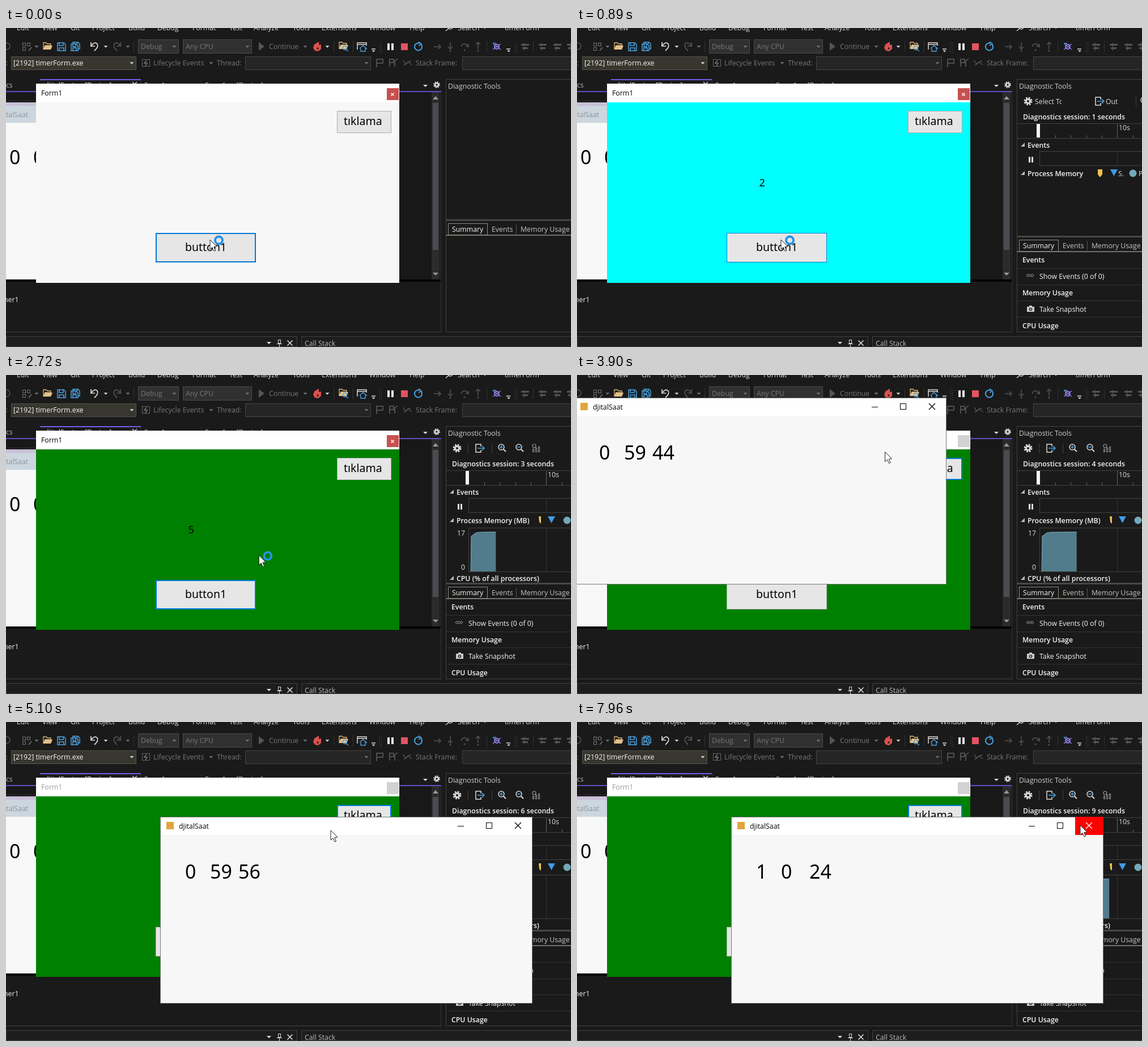
Animation, 997 px wide and 562 px high, one loop 7990 ms. Source, as an HTML page with a canvas:

```html
<!DOCTYPE html>
<html lang="tr">
<head>
<meta charset="utf-8">
<title>Timer form</title>
<style>
html, body { margin: 0; width: 100%; height: 100%; overflow: hidden; background: #1a1a1a; }
canvas { display: block; }
</style>
</head>
<body>
<canvas id="stage" width="997" height="562"></canvas>
<script>
const g = document.getElementById('stage').getContext('2d');
const LOOP = 7990, OPEN = 3420;
const DIM = '#777', LIGHT = '#dcdcdc', LINE = '#414141', BLUE = '#4ba3e3';

function rect(x, y, w, h, fill, stroke) {
  if (fill) { g.fillStyle = fill; g.fillRect(x, y, w, h); }
  if (stroke) { g.strokeStyle = stroke; g.lineWidth = 1; g.strokeRect(x + .5, y + .5, w - 1, h - 1); }
}
function text(s, x, y, color = LIGHT, size = 12.3, weight = 400, family = 'Open Sans') {
  g.font = `${weight} ${size}px "${family}", sans-serif`;
  g.fillStyle = color;
  g.fillText(s, x, y);
}
function digits(s, x, y) { text(s, x, y, '#000', 34, 500, 'Noto Sans'); }
function path(points, stroke, width = 1.5, fill) {
  g.beginPath();
  for (let i = 0; i < points.length; i += 2) g.lineTo(points[i], points[i + 1]);
  if (fill) { g.closePath(); g.fillStyle = fill; g.fill(); }
  if (stroke) { g.strokeStyle = stroke; g.lineWidth = width; g.stroke(); }
}
function arc(x, y, r, stroke, width = 1.5, from = 0, to = 7) {
  g.beginPath(); g.arc(x, y, r, from, to);
  g.strokeStyle = stroke; g.lineWidth = width; g.stroke();
}
function dot(x, y, r, color) { g.beginPath(); g.arc(x, y, r, 0, 7); g.fillStyle = color; g.fill(); }
function down(x, y, color = LIGHT, r = 4) { path([x - r, y - r / 2, x + r, y - r / 2, x, y + r / 2], 0, 0, color); }
function clipped(x, y, w, h, draw) {
  g.save(); g.beginPath(); g.rect(x, y, w, h); g.clip(); draw(); g.restore();
}
function cross(x, y, r, color, width = 1.2) {
  path([x - r, y - r, x + r, y + r], color, width);
  path([x - r, y + r, x + r, y - r], color, width);
}
function gear(x, y, r, color) {
  g.setLineDash([r * .45, r * .335]); arc(x, y, r, color, r * .5); g.setLineDash([]);
  arc(x, y, r * .6, color, r * .5);
}
function folder(x, y) {
  path([x, y + 12, x, y, x + 5, y, x + 7, y + 2, x + 13, y + 2, x + 13, y + 5, x + 3, y + 5, x, y + 12], '#dcb67a', 1.3);
  path([x, y + 12, x + 3, y + 5, x + 16, y + 5, x + 13, y + 12], 0, 0, '#e3c088');
}
function disk(x, y, s) {
  rect(x, y, s, s, '#1a1a1a');
  path([x, y, x + s - 3, y, x + s, y + 3, x + s, y + s, x, y + s, x, y - .7], BLUE, 1.5);
  path([x + 3, y, x + 3, y + 5, x + s - 4, y + 5, x + s - 4, y], BLUE);
  path([x + 3, y + s, x + 3, y + s - 5, x + s - 3, y + s - 5, x + s - 3, y + s], BLUE);
}
function arrow(x, y, dx, dy, color) {
  path([x - dx * 6, y - dy * 6, x + dx * 6, y + dy * 6], color);
  path([x + dx * 2 - dy * 4, y + dy * 2 - dx * 4, x + dx * 6, y + dy * 6, x + dx * 2 + dy * 4, y + dy * 2 + dx * 4], color);
}
function grip(x) { for (let y = 25; y < 42; y += 4) { rect(x, y, 1, 1, '#666'); rect(x + 3, y + 2, 1, 1, '#666'); } }

// position along [time, x, y] keys
function along(keys, t) {
  let i = 1;
  while (i < keys.length - 1 && keys[i][0] < t) i++;
  const [a, b] = [keys[i - 1], keys[i]];
  const k = Math.min(1, Math.max(0, (t - a[0]) / (b[0] - a[0])));
  return [a[1] + (b[1] - a[1]) * k, a[2] + (b[2] - a[2]) * k];
}
const clockPath = [[4610, -5, 40], [4800, 90, 86], [5070, 272, 167]];
const mousePath = [[2040, 360, 373], [2720, 446, 318], [3250, 625, 162], [3780, 625, 162], [3900, 544, 136],
  [4150, 430, 30], [4570, 296, 64]];
const exitPath = [[6230, 573, 191], [6900, 888, 182]];

function toolbars() {
  const menu = [['Edit', 19], ['View', 64], ['Git', 114], ['Project', 152], ['Build', 216], ['Debug', 267], ['Format', 329],
    ['Test', 394], ['Analyze', 437], ['Tools', 506], ['Extensions', 557], ['Window', 641], ['Help', 712], ['Search', 797], ['timerForm', 880]];
  for (const [s, x] of menu) text(s, x, 4);
  arc(784, -2, 4, LIGHT); path([781, 1, 776, 5], LIGHT); down(845, 0, LIGHT, 3);

  arc(1, 32, 6, '#555', 1.5);
  for (const [x, y] of [[29, 26], [37, 26], [29, 34]]) rect(x, y, 6, 6, 0, '#777');
  path([40, 40, 45, 34], '#777');
  for (const [x, c] of [[54, DIM], [176, LIGHT], [215, DIM], [528, DIM], [567, LIGHT]]) down(x, 33, c, 3.5);
  folder(66, 26); disk(91, 26, 14); disk(118, 25, 12); disk(115, 28, 12);
  for (const [x, d, c] of [[156, 1, LIGHT], [196, -1, '#555']]) {
    path([x - 6 * d, 25, x - 6 * d, 32, x + d, 32], c, 1.7);
    g.beginPath(); g.moveTo(x - 6 * d, 32); g.quadraticCurveTo(x, 23, x + 5 * d, 28);
    g.quadraticCurveTo(x + 8 * d, 33, x, 40); g.strokeStyle = c; g.stroke();
  }
  for (const [x, w, s] of [[233, 72, 'Debug'], [312, 122, 'Any CPU']]) {
    rect(x, 20, w, 25, '#303030', '#4a4a4a'); text(s, x + 5, 37, DIM); down(x + w - 8, 33, DIM, 3.5);
  }
  path([446, 25, 456, 32.5, 446, 40], 0, 0, '#555');
  text('Continue', 464, 37, DIM);
  path([552, 24, 552, 30, 556, 29, 556, 37, 551, 41, 545, 40, 542, 35, 544, 29], 0, 0, '#d9534f');
  path([550, 33, 552, 37, 548, 38], 0, 0, '#1a1a1a');
  folder(588, 25); arc(598, 35, 3.5, BLUE); path([600, 38, 604, 41], BLUE);
  for (const x of [225, 578, 612]) rect(x, 23, 1, 20, '#333');
  path([620, 38, 620, 26, 636, 26, 636, 31], LIGHT, 1.5); path([620, 29, 636, 29], LIGHT);
  path([624, 36, 630, 31, 636, 36, 634, 36, 634, 41, 626, 41, 626, 36], BLUE, 1.4);
  path([645, 37, 652, 37], LIGHT); down(648.5, 41, LIGHT, 3); grip(659);
  rect(673, 27, 4, 12, '#eee'); rect(680, 27, 4, 12, '#eee'); rect(697, 27, 12, 12, '#e45361');
  arc(727.5, 33, 6.5, BLUE, 2, -.7, 5.1); path([728, 24, 733, 28, 728, 31], BLUE, 1.6);
  arrow(761, 33, 1, 0, '#555'); arrow(784, 31, 0, 1, '#555'); dot(784, 40, 1.5, '#555');
  arc(809, 34, 6, '#555', 1.5, 3.3, 6.1); dot(809, 39, 1.5, '#555'); path([811, 32, 816, 33, 816, 28], '#555');
  arrow(833, 31, 0, -1, '#555'); dot(833, 40, 1.5, '#555'); rect(848, 23, 1, 20, '#333');
  arc(866, 33, 4, '#8f7fe8', 2); path([859, 38, 873, 28], '#8f7fe8'); path([860, 28, 873, 38], '#8f7fe8'); path([859, 27, 865, 27], BLUE);
  path([883, 37, 890, 37], LIGHT); down(887, 41, LIGHT, 3); grip(898);
  for (const x of [909, 940, 966, 990]) {
    rect(x + 5, 26, 1, 14, '#555'); rect(x, 28, 14, 3, '#555'); rect(x + 2, 34, 10, 3, '#555');
  }
  rect(930, 23, 1, 20, '#333');

  text(':', 0, 66, DIM);
  rect(9, 50, 221, 24, '#38372f', '#55534a'); text('[2192] timerForm.exe', 13, 66, '#f5f5f5'); down(222, 62, LIGHT, 3.5);
  rect(240, 55, 14, 13, 0, '#666'); path([248, 57, 244, 62, 249, 62, 246, 67], '#777');
  text('Lifecycle Events', 260, 66, DIM); down(362, 62, DIM, 3.5); text('Thread:', 372, 66, DIM);
  rect(422, 50, 222, 24, '#252525', '#444'); down(636, 62, DIM, 3.5);
  path([654, 69, 654, 55, 665, 55, 665, 62, 654, 62], '#606060');
  path([677, 68, 677, 55, 684, 55, 684, 61, 677, 61], '#606060'); path([686, 68, 686, 58, 691, 54], '#606060');
  path([701, 57, 705, 64, 710, 60, 716, 65], '#505050'); path([702, 66, 709, 60, 715, 58], '#505050');
  text('Stack Frame:', 723, 66, DIM); rect(805, 50, 200, 24, '#252525', '#444');
}

function editor() {
  text('cs', 0, 105, '#b5b5b5');
  rect(60, 90, 178, 2, '#7160e8');
  text('djitalSaat.cs [Design]', 68, 105); cross(227, 99, 4, LIGHT);
  text('Form1.cs', 244, 105, '#b5b5b5'); text('Form1.cs [Design]', 351, 105, '#b5b5b5');
  rect(238, 92, 1, 18, '#333'); rect(344, 92, 1, 18, '#333');
  rect(0, 111, 768, 2, '#5b4fc0');
  down(740, 102); gear(760, 100, 4.7, LIGHT);
  rect(0, 113, 751, 330, '#181818');
  rect(751, 113, 14, 330, '#2b2b2b');
  path([753, 126, 758, 120, 763, 126], 0, 0, '#999'); rect(753, 132, 10, 259, '#4d4a52'); down(758, 433.5, '#999', 5);
  for (let x = 0; x < 53; x += 4) rect(x, 128, 2, 1, '#4a4a4a');
  rect(0, 131, 53, 6, '#c9bfd8'); rect(0, 137, 53, 30, '#cbd6de'); text('talSaat', 0, 157, '#8b959c');
  rect(0, 167, 53, 276, '#f8f8f8');
  digits('0', 6, 240); digits('0', 48, 240);
  rect(0, 443, 768, 4, '#000'); rect(767, 113, 1, 423, '#333'); rect(0, 535, 768, 1, LINE);
  text('ner1', -4, 483, '#eee');
  rect(0, 543, 514, 19, '#1d1d1d', LINE); rect(521, 543, 480, 19, '#1d1d1d', LINE);
  down(464, 555); rect(480, 549, 5, 7, 0, LIGHT); rect(478, 556, 9, 1, LIGHT); rect(482, 557, 1, 5, LIGHT);
  cross(501, 555, 4.5, LIGHT, 1.6);
  text('Call Stack', 527, 560, '#bbb');
}

function diagTabs(y) {
  rect(776, y - 7, 221, 3, '#474744');
  rect(776, y + 20, 221, 2, '#6d7468');
  rect(780, y, 70, 21, '#1a1a1a', '#8a8f85');
  text('Summary', 787, y + 15, '#f5f5f5'); text('Events', 857, y + 15, '#c4c4c4'); text('Memory Usage', 908, y + 15, '#c4c4c4');
  rect(900, y + 2, 1, 17, '#555');
}
function heading(s, y) {
  path([783, y, 790, y, 790, y - 7], 0, 0, '#bbb');
  text(s, 795, y + 2, '#f5f5f5', 12.3, 600);
}
function zoom(x, plus) {
  arc(x - 1, 127, 5, LIGHT); path([x + 3, 131, x + 7, 135], LIGHT, 2);
  path([x - 4, 127, x + 2, 127], BLUE); if (plus) path([x - 1, 124, x - 1, 130], BLUE);
}
function out(x) {
  path([x + 9, 126, x + 9, 122, x, 122, x, 136, x + 9, 136, x + 9, 132], LIGHT);
  arrow(x + 9, 129, 1, 0, BLUE);
}
function diagnostics(t) {
  rect(776, 90, 230, 446, '#1a1a1a', LINE);
  text('Diagnostic Tools', 780, 107, '#d0d0d0');
  if (t < 600) return diagTabs(344);
  const ready = t >= 1060, seconds = Math.max(1, Math.floor(t / 900 + .4));
  gear(796, 129, 6, LIGHT);
  if (ready) {
    rect(815, 121, 1, 17, LINE); out(829); rect(857, 121, 1, 17, LINE);
    zoom(875, true); zoom(906);
    for (let i = 0; i < 3; i++) rect(929 + i * 5, 130 - i * 2, 3, 6 + i * 2, 0, '#999');
    arc(932, 125, 3, '#999', 1.2);
  } else {
    clipped(808, 118, 47, 22, () => text('Select Tools', 808, 134));
    out(915); text('Out', 933, 134); rect(986, 121, 1, 17, LINE); arc(1000, 127, 5, LIGHT);
  }
  text(`Diagnostics session: ${seconds} seconds`, 787, 161, '#f5f5f5', 12.3, 600);
  rect(776, 168, 230, 27, 0, LINE);
  for (let i = 0; i < 6; i++) rect(Math.round(844 + i * 27.3), i == 4 ? 169 : 189, 1, i == 4 ? 25 : 5, '#666');
  rect(811, 169, 6, 24, '#f5f5f5'); text('10s', 956, 180);
  heading('Events', 209);
  rect(797, 227, 3, 10, LIGHT); rect(802, 227, 3, 10, LIGHT);
  rect(816, 217, 190, 26, 0, LINE); rect(953, 218, 1, 24, '#333');
  heading('Process Memory' + (ready ? ' (MB)' : ''), 259);
  const x = ready ? 956 : 941;
  if (ready) path([940, 249, 944, 249, 944, 262, 941, 259], 0, 0, '#f0c050');
  else path([919, 249, 927, 249, 927, 258, 923, 263, 919, 258], 0, 0, '#f0c050');
  path([x, 249, x + 13, 249, x + 6.5, 261], 0, 0, '#3f9be8');
  dot(ready ? 990 : 981, 256, 6.5, '#74a9b9');
  if (!ready) { text('S.', 955, 261); text('P', 991, 261); }
  else {
    text('17', 796, 283); text('0', 803, 343);
    rect(816, 269, 190, 78, 0, LINE); rect(953, 270, 1, 76, '#333');
    const right = 850 + 2.88 * Math.floor((t - 1670) / 200);
    path([820, 346, 821, 284, 829, 278, 836, 277, right, 276.5, right, 346], 0, 0, '#527c8c');
    path([820, 346, 821, 284, 829, 278, 836, 277, right, 276.5], '#76a9b8', 1);
    heading('CPU (% of all processors)', 361);
  }
  rect(777, 366, 220, 30, '#1a1a1a');
  diagTabs(373);
  for (const [s, y] of [['Events', 413], ['Memory Usage', 471], ['CPU Usage', 529]]) text(s, 786, y, '#f5f5f5', 12.3, 600);
  for (let y = 423; y < 520; y += 28.6) rect(777, Math.round(y), 220, 1, '#333');
  for (let i = 0; i < 3; i++) path([795.5 + i * 4, 433.5, 798 + i * 4, 436, 795.5 + i * 4, 438.5, 793 + i * 4, 436, 795.5 + i * 4, 433.5], '#aaa', 1);
  text('Show Events (0 of 0)', 816, 442, '#f5f5f5');
  rect(794, 491, 13, 9, '#ccc'); rect(798, 489, 5, 3, '#ccc'); dot(800.5, 495.5, 2.8, '#1a1a1a'); dot(800.5, 495.5, 1.4, '#ccc');
  text('Take Snapshot', 816, 500, '#f5f5f5');
}

function button(x, y, w, h, label, tx, ty, border, focused) {
  rect(x, y, w, h, '#e6e6e6', border);
  if (focused) rect(x + 1, y + 1, w - 2, h - 2, 0, border);
  text(label, tx, ty, '#000', 19.5, 400, 'Noto Sans');
}
function form(t, mouse) {
  const active = t < OPEN, count = Math.min(5, Math.floor((t - 30) / 402));
  const hover = t > 100 && mouse[1] > 361 && mouse[1] < 413;
  rect(53, 98, 641, 351, ['#f7f7f7', 'red', '#00ffff', 'yellow', '#f0deb8', '#008000'][Math.max(0, count)]);
  rect(53, 98, 641, 33, '#fff');
  text('Form1', 62, 119, active ? '#000' : '#999');
  rect(672, 106, 21, 21, active ? '#c75050' : '#d2d2d2');
  if (active) cross(682, 117, 2.5, '#fff', 1.4);
  if (count > 0) text(count, 321.5, 279, '#000', 18, 400, 'Noto Sans');
  button(584, 146, 96, 39, 'tıklama', 596, 171, active ? '#adadad' : '#0078d7', !active);
  button(264, 361, 177, 52, 'button1', 316, 393, active ? '#0078d7' : '#adadad', !hover && active);
}

function clock(t, [x, y], mouse) {
  const total = 3584 + Math.floor((t - 3836) / 102.9);
  const hot = mouse[0] > x + 607 && mouse[0] < x + 657 && mouse[1] > y && mouse[1] < y + 33;
  g.save(); g.translate(Math.round(x), Math.round(y));
  rect(0, 0, 657, 329, '#f7f7f7');
  rect(0, 0, 657, 33, '#fff'); rect(0, 33, 657, 1, '#eee');
  rect(0, 0, 657, 329, 0, '#777');
  rect(11, 9, 13, 13, '#e0a53c');
  text('djitalSaat', 33, 21, '#000');
  if (hot) rect(607, 0, 50, 32, '#f00');
  rect(525, 16, 11, 1, '#000'); rect(575, 10, 11, 11, 0, '#000'); cross(631.5, 15.5, 5.5, hot ? '#fff' : '#000');
  const parts = [Math.floor(total / 3600), Math.floor(total / 60) % 60, total % 60];
  parts.forEach((n, i) => digits(n, [44, 88, 138][i], 109));
  g.restore();
}

function pointer([x, y], busy) {
  if (busy) arc(x + 15.5, y + 1, 6.5, '#2492e6', 3.8);
  path([x, y, x, y + 17, x + 4, y + 13.5, x + 7, y + 20, x + 9.5, y + 19, x + 6.8, y + 12.5, x + 12, y + 12, x, y], '#222', 1, '#fff');
}

function draw(t) {
  const pos = along(clockPath, t);
  const mouse = t < 4610 ? along(mousePath, t) : t < 6230 ? [pos[0] + 301, pos[1] + 24] : along(exitPath, t);
  rect(0, 0, 997, 562, '#1a1a1a');
  toolbars(); editor(); diagnostics(t);
  form(t, mouse);
  if (t >= OPEN) clock(t, pos, mouse);
  pointer(mouse, t < OPEN);
}
const start = performance.now();
(function tick(now) {
  draw(Math.max(0, now - start) % LOOP);
  requestAnimationFrame(tick);
})(start);
</script>
</body>
</html>
```
